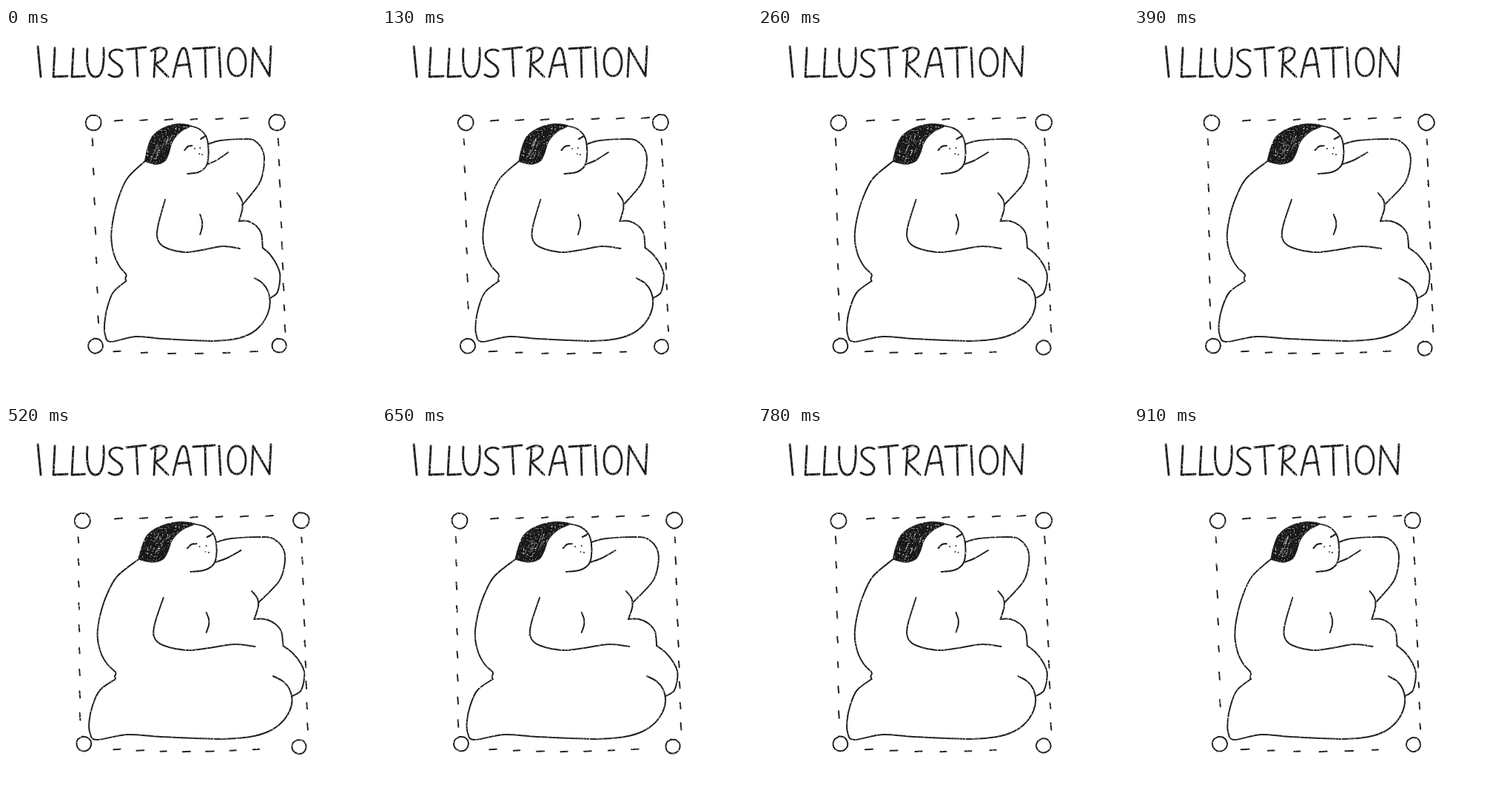
These frames come from a looping animation (500x500 px, 1040 ms). An HTML page:

```html
<!DOCTYPE html>
<html lang="en">
<head>
<meta charset="utf-8">
<title>Illustration</title>
<style>
  html, body { margin: 0; width: 100%; height: 100%; overflow: hidden; background: #fff; }
  svg { display: block; width: 100vw; height: 100vh; }
  path { fill: none; stroke: #1e1e1e; stroke-width: 2; stroke-linecap: round; stroke-linejoin: round; }
  .title path { stroke-width: 2.9; }
  .pose { display: none; }
  .pose .hair { fill: #181818; stroke-width: 1.5; }
  .pose .scratch { stroke: #fff; stroke-width: .8; opacity: .6; }
  .pose .brow { stroke-width: 2.2; }
</style>
</head>
<body>
<svg id="stage" viewBox="0 0 500 500" role="img" aria-label="ILLUSTRATION">
  <filter id="pencil" filterUnits="userSpaceOnUse" x="0" y="0" width="500" height="500" color-interpolation-filters="sRGB">
    <feTurbulence type="fractalNoise" baseFrequency=".45" numOctaves="2" seed="4" result="noise"/>
    <feDisplacementMap in="SourceGraphic" in2="noise" scale="1.5" xChannelSelector="R" yChannelSelector="G" result="rough"/>
    <feColorMatrix in="noise" values="0 0 0 0 0  0 0 0 0 0  0 0 0 0 0  0 0 4 0 -.6" result="grain"/>
    <feComposite in="rough" in2="grain" operator="in"/>
  </filter>
  <g class="title" id="title" filter="url(#pencil)"></g>
</svg>
<script>
const STEP = 130;
const WIDTHS = [0, .36, .7, 1, 1.13];
const stage = document.getElementById('stage');
const title = document.getElementById('title');

function add(parent, tag, attrs) {
  const el = document.createElementNS('http://www.w3.org/2000/svg', tag);
  for (const k in attrs) el.setAttribute(k, attrs[k]);
  return parent.appendChild(el);
}

const parse = s => s.split(' ').map(p => p.split(',').map(Number));
const mix = (a, b, t) => a + (b - a) * t;

// Smooth curve through all points.
function curve(pts) {
  const at = i => pts[Math.max(0, Math.min(pts.length - 1, i))];
  let d = 'M' + pts[0];
  for (let i = 0; i < pts.length - 1; i++) {
    const c = [-1, 0, 1, 2].map(k => at(i + k));
    const a = [0, 1].map(k => c[1][k] + (c[2][k] - c[0][k]) / 6);
    const b = [0, 1].map(k => c[2][k] - (c[3][k] - c[1][k]) / 6);
    d += `C${a} ${b} ${c[2]}`;
  }
  return d;
}

function random(seed) {
  return () => (seed = (seed * 16807) % 2147483647) / 2147483647;
}

// Hand lettering as plain path strokes.
const LETTERS = {
  I: 'M43,25L47,66',
  L: 'M66,27L64,66L83,65 M91,28L89,66L107,65',
  U: 'M110,28C108,52 112,66 121,66S133,52 132,27',
  S: 'M157,31C150,27 139,30 140,38S158,49 157,58S146,68 139,63',
  T: 'M163,29L189,26M176,28L178,65 M253,28L282,26M269,28L270,66',
  R: 'M202,29L200,66M196,31C207,24 218,26 217,34S207,47 201,48L219,66',
  A: 'M226,66C231,48 234,27 240,27S246,48 250,66M231,51L248,49',
  i: 'M288,27L290,66',
  O: 'M312,27C304,27 300,36 300,46S304,65 312,65S324,56 324,46S319,27 311,27',
  N: 'M332,66L334,27L356,65L358,25'
};
for (const d of Object.values(LETTERS)) add(title, 'path', { d });

// Key points of the figure at medium width.
const FIGURE = {
  back: '184,180 158,203 145,229 137,257 134,283 138,306 146,322 156,333 155,338 156,342',
  legs: '347,338 359,345 367,356 370,370 367,385 357,401 341,413 319,420 285,423 212,420 170,417 133,424 125,415 124,399 128,378 137,357 156,342',
  face: '250,132 264,136 274,145 278,158 278,177 274,188 263,195 247,197',
  elbow: '278,157 296,152 337,150 351,155 360,168 361,186 354,210 329,239',
  forearm: '277,184 290,179 308,168',
  side: '321,223 328,233 329,244 324,261',
  roll: '324,261 337,261 349,267 357,278 359,297',
  hip: '359,297 370,306 380,320 385,335 381,357 370,365',
  arm: '214,232 204,265 202,281 207,292 221,299 245,303 269,300 300,295 325,298',
  fold: '266,252 269,261 269,269 266,279',
  hair: '184,180 188,163 195,147 210,136 231,130 251,132 237,140 225,153 219,170 213,180 200,184 184,180',
  brow: '243,165 248,160 254,159',
  'brow far': '267,150 274,146',
  'eye near': '258,163 258,163',
  'eye far': '266,162 266,162',
  nose: '265,170 265,170',
  mouth: '269,171 269,171'
};

// The figure widens sideways around a fixed axis.
const stretch = (x, t) => 225 + (x - 225) * (1 + .2 * t) / 1.1;

function drawFigure(g, t, rnd) {
  for (const [name, pts] of Object.entries(FIGURE)) {
    add(g, 'path', { class: name, d: curve(parse(pts).map(([x, y]) => [stretch(x, t), y])) });
  }
  for (let i = 0; i < 12; i++) {
    const y = 144 + rnd() * 28, n = 3 + rnd() * 6;
    const x = stretch(mix(208, 194, (y - 144) / 28) + rnd() * 17, t);
    add(g, 'path', { class: 'scratch', d: `M${x},${y}l${-n * .4},${n}` });
  }
}

function drawRing(g, x, y, r, rnd) {
  const n = 9, pts = [];
  for (let i = 0; i <= n; i++) {
    const a = i * Math.PI * 2 / n - 1.8, k = r * (.97 + rnd() * .06);
    pts.push([x + Math.cos(a) * k, y + Math.sin(a) * k]);
  }
  add(g, 'path', { d: curve(pts) });
}

function drawFrame(g, t, rnd) {
  const right = 366 + 29 * t;
  drawRing(g, 118 - 13 * t, 128, 10.5, rnd);
  drawRing(g, right, 127.5, 10.8, rnd);
  drawRing(g, 121 - 14 * t, 429.5, 10, rnd);
  drawRing(g, 369 + 24 * t, 429 + 4 * t, 9.6, rnd);

  const dash = (x, y, dx, dy) => add(g, 'path', { d: `M${x - dx},${y - dy}L${x + dx},${y + dy}` });
  const half = () => 4 + rnd() * 1.5;

  for (let x = 152; x < right - 20; x += 34) dash(x, mix(125, 121.5, (x - 152) / 205), half(), -.5);
  for (let x = 150; x < 345; x += 37 - 5 * t) dash(x, 437 + 3 * Math.sin((x - 150) / 60), half(), -.2);

  const sides = [
    { top: 117 - 17 * t, bottom: 125 - 22 * t, gap: 40 - 9 * t },
    { top: 368 + 28 * t, bottom: 377 + 27 * t, gap: 28 }
  ];
  for (const { top, bottom, gap } of sides) {
    for (let y = 154; y < 409; y += gap) dash(mix(top, bottom, (y - 154) / 250), y, .4, half() - .5);
  }
}

const poses = WIDTHS.map((t, i) => {
  const g = add(stage, 'g', { class: 'pose', filter: 'url(#pencil)' });
  const rnd = random(311 + i * 97);
  drawFrame(g, t, rnd);
  drawFigure(g, t, rnd);
  return g;
});

const start = performance.now();
const last = poses.length - 1;
function tick() {
  const now = Math.max(0, performance.now() - start);
  const step = Math.floor(now / STEP) % (last * 2);
  const shown = last - Math.abs(last - step);
  poses.forEach((g, i) => { g.style.display = i === shown ? 'inline' : 'none'; });
  requestAnimationFrame(tick);
}
tick();
</script>
</body>
</html>
```
